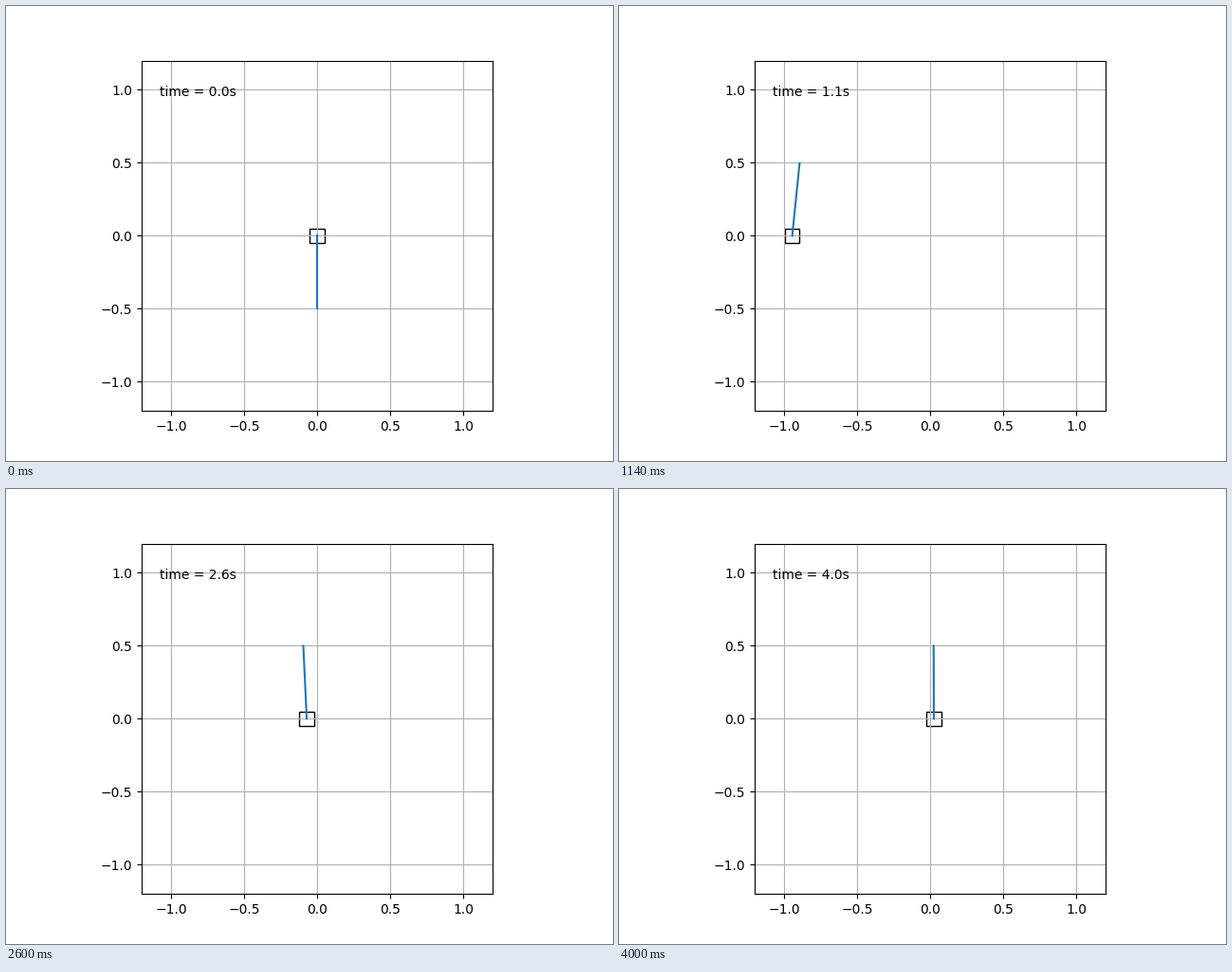
These frames come from a looping animation (640 px wide and 480 px high, 4020 ms). A matplotlib script:

```python
import numpy as np
import matplotlib.pyplot as plt
from matplotlib.animation import FuncAnimation
from matplotlib.patches import Rectangle

DT = 0.02
FRAMES = 201
POLE = 0.5
CART = 0.1

PUSH = 22       # cart acceleration of the first push
T_PUSH = 0.21   # push ends, braking starts
T_STOP = 0.455  # cart has stopped
T_CATCH = 0.72  # feedback control takes over
FAR = -1.047    # where the cart stops
DECAY = 2       # decay rate of the feedback control
RISE = 0.37     # time scale of the pole's swing-up


def settle(keys, degree):
    """Decaying motion exp(-DECAY s) * polynomial(s), fitted to key points."""
    t, v = np.array(keys).T
    s = t - T_CATCH
    poly = np.polyfit(s, v * np.exp(DECAY * s), degree, w=np.exp(-DECAY * s))
    return lambda t: np.exp(-DECAY * (t - T_CATCH)) * np.polyval(poly, t - T_CATCH)


glide = settle([(0.72, -1.043), (0.82, -1.055), (1.08, -0.979), (1.5, -0.675),
                (2.08, -0.276), (2.6, -0.071), (3.0, 0.0), (4.0, 0.0257)], 7)
lean = settle([(0.72, 0.337), (1.08, 0.118), (1.5, 0.021), (2.08, -0.049),
               (2.6, -0.043), (3.0, -0.0322), (4.0, -0.004)], 4)


def rebound(t):
    """Cubic from rest at FAR into the start of the glide."""
    h = T_CATCH - T_STOP
    u = (t - T_STOP) / h
    speed = (glide(T_CATCH + 1e-4) - glide(T_CATCH)) / 1e-4
    return (FAR + (glide(T_CATCH) - FAR) * u * u * (3 - 2 * u)
            + speed * h * u * u * (u - 1))


def cart_pos(t):
    if t < T_PUSH:
        return -PUSH * t * t / 2
    if t < T_STOP:
        start = -PUSH * T_PUSH ** 2 / 2
        left = (T_STOP - t) / (T_STOP - T_PUSH)
        return FAR + (start - FAR) * left ** 2
    return rebound(t) if t < T_CATCH else glide(t)


def pole_angle(t):
    """Counter-clockwise from hanging straight down, in radians."""
    if t >= T_CATCH:
        return np.pi - lean(t)
    grow = lambda t: 1 - np.exp(-(t / RISE) ** 2)
    return (np.pi - lean(T_CATCH)) * grow(t) / grow(T_CATCH)


fig = plt.figure(figsize=(6.4, 4.8), dpi=100)
ax = fig.add_subplot(111, xlim=(-1.2, 1.2), ylim=(-1.2, 1.2))
ax.set_aspect("equal")
ticks = np.arange(-1, 1.01, 0.5)
ax.set_xticks(ticks)
ax.set_yticks(ticks)
ax.grid()

cart = ax.add_patch(Rectangle((-CART / 2, -CART / 2), CART, CART,
                              fill=False, ec="black", lw=1))
pole, = ax.plot([], [], color="C0", lw=1.5)
label = ax.text(0.05, 0.9, "", transform=ax.transAxes)


def draw(i):
    t = i * DT
    x, angle = cart_pos(t), pole_angle(t)
    cart.set_x(x - CART / 2)
    pole.set_data([x, x + POLE * np.sin(angle)], [0, -POLE * np.cos(angle)])
    label.set_text(f"time = {t:.1f}s")
    return cart, pole, label


anim = FuncAnimation(fig, draw, frames=FRAMES, interval=1000 * DT, repeat=True)
plt.show()
```
